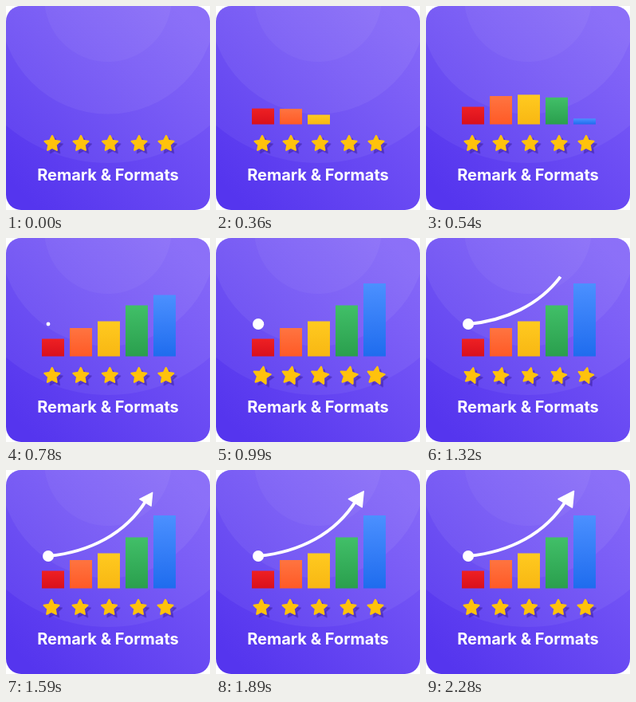
Recreate the animation shown at these times as an HTML page with a canvas. Size 256x256 px, loop 2.88 s.

```html
<!DOCTYPE html>
<html lang="en">
<head>
<meta charset="utf-8">
<style>
  html, body { margin: 0; height: 100%; overflow: hidden; background: #fff; }
  canvas { display: block; }
</style>
</head>
<body>
<canvas width="256" height="256"></canvas>
<script>
const ctx = document.querySelector('canvas').getContext('2d');
const LOOP = 2880, STEP = 30, LAST_STEP = 2280, BASE = 148.5;

// x, full height, start time, top colour, bottom colour
const bars = [
  [45, 22, 75, '#ee2023', '#d9101c'],
  [80, 35.5, 187, '#ff7440', '#ff5a26'],
  [115, 44, 274, '#ffca20', '#f8b713'],
  [150, 64, 374, '#41bf68', '#2a9f4d'],
  [185, 91.5, 515, '#4b90ff', '#1f6cee']
];
const starXs = [58, 94, 130.5, 167, 201];

const progress = (t, start, length) => Math.min(1, Math.max(0, (t - start) / length));
const ease = p => (1 - Math.cos(Math.PI * p)) / 2;

function gradient(x0, y0, x1, y1, from, to) {
  const g = ctx.createLinearGradient(x0, y0, x1, y1);
  g.addColorStop(0, from);
  g.addColorStop(1, to);
  return g;
}

function disc(x, y, r, fill) {
  ctx.fillStyle = fill;
  ctx.beginPath();
  ctx.arc(x, y, r, 0, 2 * Math.PI);
  ctx.fill();
}

function drawCard() {
  ctx.save();
  ctx.beginPath();
  ctx.roundRect(0, 0, 256, 256, 19);
  ctx.clip();
  ctx.fillStyle = gradient(20, 236, 236, 20, '#5535ee', '#7d5ef8');
  ctx.fillRect(0, 0, 256, 256);
  const sheen = gradient(20, 236, 236, 20, 'rgba(255,255,255,.05)', 'rgba(255,255,255,.06)');
  disc(128, 0, 197, sheen);
  disc(128, 0, 135.5, sheen);
  disc(128, -10, 80, 'rgba(255,255,255,.04)');
  ctx.restore();
}

function drawBars(t) {
  for (const [x, height, start, top, bottom] of bars) {
    const h = height * progress(t, start, 315);
    if (!h) continue;
    ctx.fillStyle = gradient(0, BASE - h, 0, BASE, top, bottom);
    ctx.fillRect(x, BASE - h, 28, h);
  }
}

function starPath() {
  ctx.beginPath();
  for (let i = 0; i < 10; i++) {
    const r = i % 2 ? 5 : 10, a = i * Math.PI / 5;
    ctx.lineTo(r * Math.sin(a), -r * Math.cos(a));
  }
  ctx.closePath();
}

function drawStars(t) {
  const shift = -progress(t, 570, 1050);
  const tilt = 0.24 * Math.sin(Math.PI * progress(t, 800, 760));
  const size = 1 + 0.12 * Math.sin(Math.PI * progress(t, 780, 500));
  ctx.lineWidth = 2;
  ctx.lineJoin = 'round';
  for (const x of starXs) {
    for (const [offset, color] of [[3.5, 'rgba(60,30,160,.4)'], [0, '#ffc20c']]) {
      ctx.save();
      ctx.translate(x + shift + offset, 172.8 + offset);
      ctx.rotate(tilt);
      ctx.scale(size, size);
      starPath();
      ctx.fillStyle = ctx.strokeStyle = color;
      ctx.fill();
      ctx.stroke();
      ctx.restore();
    }
  }
}

function drawArrow(t) {
  const r = 7 * ease(progress(t, 720, 150));
  if (r) disc(53, 108, r, '#fff');

  const drawn = ease(progress(t, 920, 500));
  if (drawn) {
    ctx.save();
    ctx.setLineDash([148 * drawn, 400]);
    ctx.lineWidth = 4;
    ctx.strokeStyle = '#fff';
    ctx.beginPath();
    ctx.moveTo(53, 108);
    ctx.bezierCurveTo(105, 103, 150, 80, 176, 38);
    ctx.stroke();
    ctx.restore();
  }

  const u = t - 1525;
  if (u > 0) {
    const size = 1 - Math.exp(-0.008 * u) * Math.cos(2 * Math.PI * u / 320);
    ctx.save();
    ctx.translate(175.5, 36.5);
    ctx.scale(size, size);
    ctx.beginPath();
    ctx.moveTo(10, -10);
    ctx.lineTo(-9.5, 0);
    ctx.lineTo(8, 10.5);
    ctx.closePath();
    ctx.fillStyle = ctx.strokeStyle = '#fff';
    ctx.lineWidth = 1.5;
    ctx.lineJoin = 'round';
    ctx.fill();
    ctx.stroke();
    ctx.restore();
  }
}

function drawTitle() {
  ctx.font = '700 20px Inter, "Open Sans", sans-serif';
  ctx.textAlign = 'center';
  ctx.fillStyle = '#fff';
  ctx.fillText('Remark & Formats', 128, 219);
}

function render() {
  const now = performance.now() % LOOP;
  const t = Math.min(LAST_STEP, Math.floor(now / STEP) * STEP);
  ctx.clearRect(0, 0, 256, 256);
  drawCard();
  drawBars(t);
  drawStars(t);
  drawArrow(t);
  drawTitle();
  requestAnimationFrame(render);
}
render();
</script>
</body>
</html>
```
